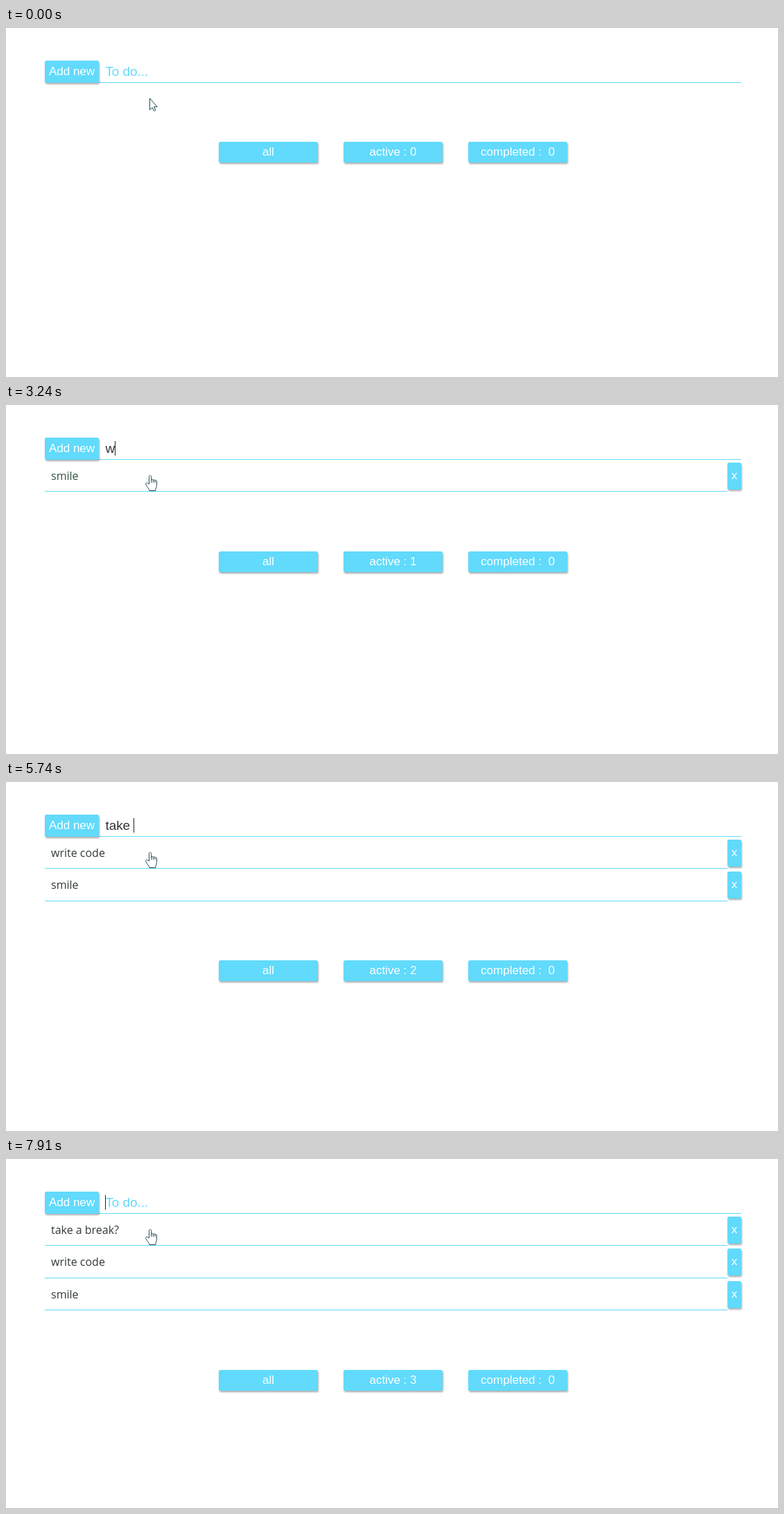
These frames come from a looping animation (1114 by 503 pixels, 8000 ms). An HTML page:

```html
<!DOCTYPE html>
<html lang="en">
<head>
<meta charset="utf-8">
<title>To do list</title>
<style>
  html, body { margin: 0; width: 100%; height: 100%; overflow: hidden; background: #fff; }
  svg { display: block; }
  text { font: 17px "Liberation Sans", Arial, sans-serif; white-space: pre; }
  .btn rect { fill: #61dafb; filter: drop-shadow(1px 2px 1px rgba(0, 0, 0, .32)); }
  .btn text { fill: #fff; text-anchor: middle; }
  .line { fill: #61dafb; }
  .field { font-size: 18.9px; fill: #333; }
  .hint { fill: #61dafb; }
  .item { font: 16px "Open Sans", "Noto Sans", sans-serif; }
  .pointer { fill: #fff; stroke: #234b50; stroke-linejoin: round; stroke-linecap: round; }
</style>
</head>
<body>
<svg id="stage" width="1114" height="503" viewBox="0 0 1114 503">
  <rect class="line" x="134" y="78" width="927" height="1"/>
  <text class="field hint" id="hint" x="143.4" y="69">To do...</text>
  <text class="field" id="typed" x="143.4" y="69"></text>
  <rect id="caret" y="52" width="1" height="21" fill="#222"/>
  <g id="rows"></g>
  <g id="filters"></g>
  <path class="pointer" id="arrow" d="M207.5 101.8V118l3.7-3.4 2.3 5 2.3-1-2.2-5h4.2z"/>
  <g class="pointer" id="hand">
    <path d="M206.5 113.5V103.3c0-2.3 3.2-2.3 3.2 0V108.5c0-1.6 2.7-1.5 2.7.2 0-1.4 2.6-1.3 2.6.5 0-1.2 2.5-1 2.5.8V115.5c0 3.2-1.6 4.3-1.8 8H207c-.3-2.6-3.4-5-5.2-8.8-1-2.2 1.6-3.4 3-1.8z"/>
    <path d="M209.7 108.5v3.2M212.4 109v2.7M215 109.5v2.2" fill="none"/>
  </g>
</svg>
<script>
const LOOP = 8000, PITCH = 46.5;
const $ = id => document.getElementById(id);

// [start ms, field text, caret visible]
const steps = [
  [0, '', false], [350, '', true],
  [900, 's', true], [990, 'sm', true], [1080, 'smi', true],
  [1310, 'smil', true], [1460, 'smile', true],
  [1920, '', true], [2470, '', false], [2930, '', true],
  [3180, 'w', true], [3250, 'wr', true], [3320, 'wri', true],
  [3480, 'writ', true], [3630, 'write', true], [3710, 'write ', true],
  [4030, 'write c', true], [4110, 'write co', true],
  [4260, 'write cod', true], [4340, 'write code', true],
  [4640, '', true], [5110, 't', true],
  [5420, 'ta', true], [5500, 'tak', true],
  [5650, 'take', true], [5740, 'take ', true], [5970, 'take a ', true],
  [6440, 'take a b', true], [6530, 'take a br', true], [6610, 'take a bre', true],
  [6840, 'take a brea', true], [6900, 'take a break', true],
  [7450, 'take a break', false], [7770, 'take a break?', true],
  [7910, '', true]
];
const items = [[1920, 'smile'], [4640, 'write code'], [7910, 'take a break?']];

const button = (x, y, w, h, label, base) =>
  `<g class="btn"><rect x="${x}" y="${y}" width="${w}" height="${h}" rx="2.5"/>` +
  `<text x="${x + w / 2}" y="${base}">${label}</text></g>`;

function row(label, i, color) {
  const dy = Math.floor(i * PITCH);
  return `<text class="item" x="65" y="${108 + dy}" fill="${color}">${label}</text>` +
    `<rect class="line" x="56" y="${124 + Math.round(i * PITCH)}" width="985" height="1"/>` +
    button(1041, 83 + dy, 20, 39, 'x', 107 + dy);
}

function draw([start, text, caretOn]) {
  $('typed').textContent = text;
  $('hint').style.display = text ? 'none' : '';
  const width = text ? $('typed').getComputedTextLength() : 0;
  $('caret').setAttribute('x', Math.round(143.4 + width));
  $('caret').style.display = caretOn ? '' : 'none';

  const list = items.filter(([at]) => at <= start).reverse();
  const count = list.length;
  const color = count === 1 ? '#2f5540' : '#333a3c';
  $('rows').innerHTML = list.map(([, label], i) => row(label, i, color)).join('');

  const dy = Math.round(count * PITCH);
  $('filters').innerHTML = ['all', `active : ${count}`, 'completed :  0']
    .map((label, i) => button(307 + 180 * i, 164 + dy, 143, 30, label, 184 + dy)).join('');

  $('arrow').style.display = count ? 'none' : '';
  $('hand').style.display = count ? '' : 'none';
}

$('rows').insertAdjacentHTML('beforebegin', button(56, 47, 78, 32, 'Add new', 68));

let shown;
const origin = performance.now();
function tick() {
  const t = (performance.now() - origin) % LOOP;
  const step = steps.findLast(([start]) => start <= t);
  if (step !== shown) draw(shown = step);
  requestAnimationFrame(tick);
}
tick();
</script>
</body>
</html>
```
